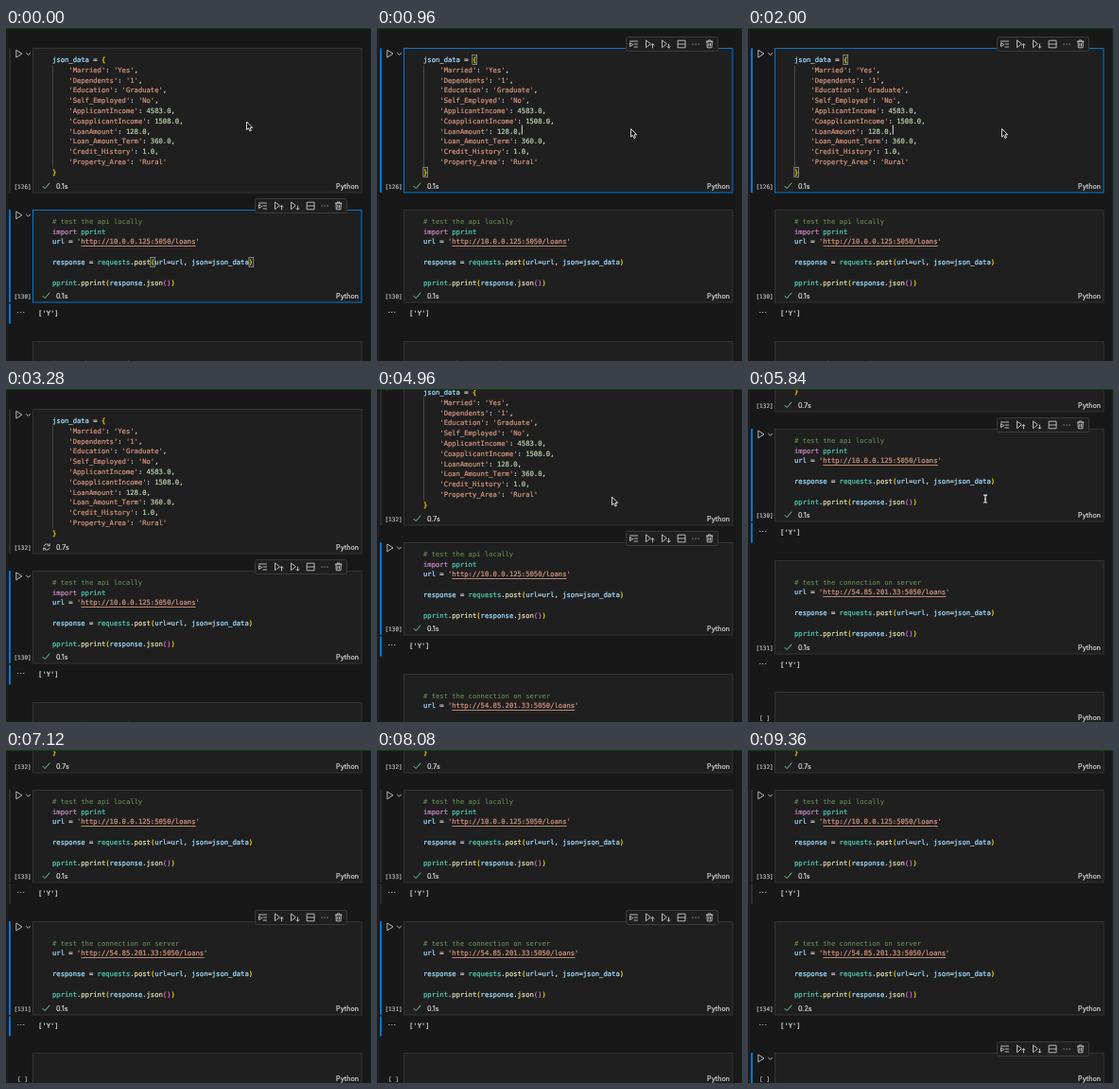
Write an HTML page that moves like this. It is 386 px wide and 352 px high and loops after 9.44 s.

```html
<!DOCTYPE html>
<html lang="en">
<head>
<meta charset="utf-8">
<title>Notebook run</title>
<style>
  html, body { margin: 0; width: 100%; height: 100%; overflow: hidden; background: #181818; }
  svg { display: block; width: 386px; height: 352px; }
  text, tspan { fill: var(--ink); stroke: var(--ink); stroke-width: .24; }
  text { --ink: #d0d0d0; white-space: pre; font: 7.2px Inter, sans-serif; }
  .code, .out { --ink: #d4d4d4; font: 7.2px "DejaVu Sans Mono", monospace; }
  .label { --ink: #b0b0b0; font: 6.1px "DejaVu Sans Mono", monospace; }
  .comment { --ink: #6a9955; stroke-width: 0; }
  .string { --ink: #ce9178; } .keyword { --ink: #c586c0; } .module { --ink: #4ec9b0; }
  .call { --ink: #dcdcaa; } .number { --ink: #b5cea8; } .name { --ink: #9cdcfe; }
  .outer { --ink: #ffd700; } .inner { --ink: #da70d6; }
  .box { fill: #1f1f1f; stroke: #333; }
  .bar { fill: none; }
  .hovered .bar { fill: #2d2d2d; }
  .selected .bar { fill: #0078d4; }
  .editing .box { stroke: #0078d4; }
  .run, .match, .spin { visibility: hidden; }
  .selected .run, .hovered .run, .editing .match, .running .spin { visibility: visible; }
  .running .check { visibility: hidden; }
  .match { fill: #00640022; stroke: #999; stroke-width: .8; }
  .icon { fill: none; stroke: #c8c8c8; stroke-width: .9; stroke-linejoin: round; stroke-linecap: round; }
  .check { stroke: #73c991; stroke-width: 1; }
  .dots { stroke-width: 1.2; }
  .link { stroke: #ce9178; stroke-width: .9; }
</style>
</head>
<body>
<svg viewBox="0 0 386 352">
  <rect width="386" height="352" fill="#181818"/>
  <path d="M1.5 0V352" stroke="#222"/>
  <g id="page">
    <g id="cells"></g>
    <path id="caret" d="M153.3 102.5V112.5" stroke="#ddd"/>
    <g id="toolbar">
      <rect x="263.5" y="-7.5" width="97" height="15" rx="2" fill="#1f1f1f" stroke="#3a3a3a"/>
      <g class="icon">
        <path d="M267.5-3H275.5M272 0H275.5M272 3H275.5M267.5-1V2.6L270.3.8Z"/>
        <path d="M284.5-3.7V3.7L289 0ZM291.5 4V-.2M290 1.2L291.5-.3L293 1.2"/>
        <path d="M301.5-3.7V3.7L306 0ZM308.5 0V4M307 2.6L308.5 4.1L310 2.6"/>
        <path d="M318.5-3.8H326V3.8H318.5ZM318.5 0H326"/>
        <path class="dots" d="M334 0h.1m2.9 0h.1m2.9 0h.1"/>
        <path d="M348.3-2.8H355M350.2-2.8V-4H353V-2.8M349-2.8L349.3 3.8H354L354.3-2.8M350.8-.8V2M352.5-.8V2"/>
      </g>
    </g>
  </g>
  <path d="M385.5 0V352" stroke="#10261a"/>
  <rect width="386" height="1" fill="#0c400c"/>
  <g id="mouse">
    <path id="arrow" d="M0 0V8.6L2 6.8L3.4 10L4.9 9.3L3.5 6.3H6.2Z" fill="#111" stroke="#eee" stroke-width=".9"/>
    <path id="beam" d="M.5-2.2Q2.3-2.2 2.5-1Q2.7-2.2 4.5-2.2M2.5-1V5.2M.5 6.2Q2.3 6.2 2.5 5.2Q2.7 6.2 4.5 6.2M1.5 2.5H3.5" fill="none" stroke="#e4e4e4" stroke-width="1.2"/>
  </g>
</svg>
<script>
const LOOP = 9440, STEP = 80, LEFT = 49, CHAR = 4.335, LINE = 10.8;
const CLICK = 640, RUN = [2560, 6480, 8320], DONE = [3360, 6640, 8560];
const $ = id => document.getElementById(id);

const request = `response = requests.post(url=url, json=json_data)

pprint.pprint(response.json())`;

const cells = [
  { top: 21.3, bottom: 174, match: [[12, 0], [0, 11]], before: 126, after: 132, was: '0.1s', took: '0.7s', code: `json_data = {
    'Married': 'Yes',
    'Dependents': '1',
    'Education': 'Graduate',
    'Self_Employed': 'No',
    'ApplicantIncome': 4583.0,
    'CoapplicantIncome': 1508.0,
    'LoanAmount': 128.0,
    'Loan_Amount_Term': 360.0,
    'Credit_History': 1.0,
    'Property_Area': 'Rural'
}` },
  { top: 192, bottom: 290, match: [[24, 4], [48, 4]], before: 130, after: 133, was: '0.1s', took: '0.1s', out: "['Y']", code: `# test the api locally
import pprint
url = 'http://10.0.0.125:5050/loans'

${request}` },
  { top: 331, bottom: 430, match: [], before: 131, after: 134, was: '0.1s', took: '0.2s', out: "['Y']", code: `
# test the connection on server
url = 'http://54.85.201.33:5050/loans'

${request}` },
  { top: 470, bottom: 504, match: [], before: ' ', code: '' }
];

const kinds = ['comment', 'string', 'keyword', 'module', 'call', 'number', 'bracket', 'name'];
const grammar = /(#.*)|('[^']*')|(\bimport\b)|(\b(?:requests|pprint)\b(?!\())|(\w+(?=\())|(\d[\d.]*)|([{}()])|(\w+)|[^\w]/g;

function highlight(line) {
  let depth = line === '}' ? 1 : 0;
  return line.replace(grammar, (token, ...groups) => {
    let kind = kinds[groups.slice(0, kinds.length).findIndex(Boolean)];
    if (!kind) return token;
    if (kind === 'bracket') {
      const level = '({'.includes(token) ? depth++ : --depth;
      kind = level ? 'inner' : 'outer';
    }
    return `<tspan class="${kind}">${token}</tspan>`;
  });
}

function codeLine(line, i, top) {
  const y = top + 14.7 + i * LINE;
  const from = line.indexOf('http');
  const link = from < 0 ? '' :
    `<path class="link" d="M${LEFT + from * CHAR} ${Math.round(y + 1.4) + .5}H${LEFT + (line.length - 1) * CHAR}"/>`;
  return `<text class="code" x="${LEFT}" y="${y}">${highlight(line)}</text>${link}`;
}

function cellMarkup({ top, bottom, match, code, out }, i) {
  const mid = bottom - 7, base = bottom - 4.5, edge = Math.round(top) + .5;
  const matches = match.map(([col, row]) =>
    `<rect class="match" x="${LEFT + col * CHAR - .2}" y="${top + 7.2 + row * LINE}" width="4.8" height="10"/>`);
  return `<g>
    <rect class="bar" x="3" y="${top}" width="2" height="${bottom - top}"/>
    <rect class="box" x="28.5" y="${edge}" width="347.5" height="${bottom - edge}"/>
    <g class="run icon"><path d="M10.8 ${top + 2.4}V${top + 9.8}L16.6 ${top + 6.1}Z"/>
      <path d="M21.5 ${top + 5.2}L23.5 ${top + 7.2}L25.5 ${top + 5.2}"/></g>
    ${i ? '' : `<path d="M49.5 39V147.5" stroke="#4c4c4c" stroke-width=".9"/>`}
    ${matches.join('')}
    ${code.split('\n').map((line, n) => codeLine(line, n, top)).join('')}
    <text class="label" x="17.6" y="${base}" text-anchor="middle"></text>
    ${code && `<path class="icon check" d="M39 ${mid + .4}L41.2 ${mid + 2.6}L46 ${mid - 3}"/>
      <g transform="translate(43 ${mid})"><path class="icon spin" d="M-3-1A3.2 3.2 0 0 1 2.8-1.5M3.2-3.4V-1.2H1M3 1A3.2 3.2 0 0 1-2.8 1.5M-3.2 3.4V1.2H-1"/></g>`}
    <text class="time" x="53" y="${base}"></text>
    <text x="373" y="${base}" text-anchor="end">Python</text>
    ${out ? `<rect class="bar" x="3" y="${bottom + 1.5}" width="2" height="21"/>
      <path class="icon dots" d="M12.7 ${bottom + 10.5}h.1m2.9 0h.1m2.9 0h.1"/>
      <text class="out" x="34" y="${bottom + 13.5}">${out}</text>` : ''}
  </g>`;
}

$('cells').innerHTML = cells.map(cellMarkup).join('');
const nodes = [...$('cells').children];

const clamp = u => Math.min(1, Math.max(0, u));
const ease = (t, from, to) => { const u = clamp((t - from) / (to - from)); return u * u * (3 - 2 * u); };
const show = (node, on) => node.setAttribute('visibility', on ? 'visible' : 'hidden');
const setText = (node, value) => { if (node.textContent !== value) node.textContent = value; };

function selection(t) {
  if (t < CLICK) return 1;
  if (t < RUN[0]) return 0;
  return 1 + (t >= RUN[1]) + (t >= RUN[2]);
}

function drawCell(cell, i, t, selected, hovered) {
  const node = nodes[i], started = t >= RUN[i], running = started && t < DONE[i];
  const editing = i === selected && t < RUN[0];
  node.setAttribute('class', Object.entries({ selected: i === selected, hovered: i === hovered, editing, running })
    .filter(([, on]) => on).map(([name]) => name).join(' '));
  const pending = running && t < RUN[i] + 160;
  setText(node.querySelector('.label'), `[${pending ? '*' : started ? cell.after : cell.before}]`);
  if (!cell.code) return;
  const elapsed = running ? `${(Math.floor((t - RUN[i]) / 100) / 10).toFixed(1)}s` : cell.took;
  setText(node.querySelector('.time'), started ? elapsed : cell.was);
  node.querySelector('.spin').setAttribute('transform', `rotate(${running ? (t - DONE[i] + STEP) * .24 : 0})`);
}

function draw(t) {
  const scroll = 150 * ease(t, 4720, 5556);
  const selected = selection(t), hovered = scroll < 62 ? 0 : 1;
  $('page').setAttribute('transform', `translate(0 ${-Math.round(scroll)})`);
  cells.forEach((cell, i) => drawCell(cell, i, t, selected, hovered));
  $('toolbar').setAttribute('transform', `translate(0 ${Math.round(cells[selected].top) - 4})`);
  show($('caret'), selected === 0 && (t - CLICK) % 1000 < 500);

  const go = ease(t, 80, 560), back = ease(t, 4160, 4640);
  $('mouse').setAttribute('transform', `translate(${254.5 + 14 * go - 20 * back} ${99 + 7.5 * go + 7.5 * back})`);
  const visible = t < RUN[0] || (t >= 4160 && t < RUN[1]);
  show($('arrow'), visible && t < 5600);
  show($('beam'), visible && t >= 5600);
}

const start = performance.now();
function tick() {
  const t = (performance.now() - start) % LOOP;
  draw(Math.floor(t / STEP) * STEP);
  requestAnimationFrame(tick);
}
draw(0);
requestAnimationFrame(tick);
</script>
</body>
</html>
```
